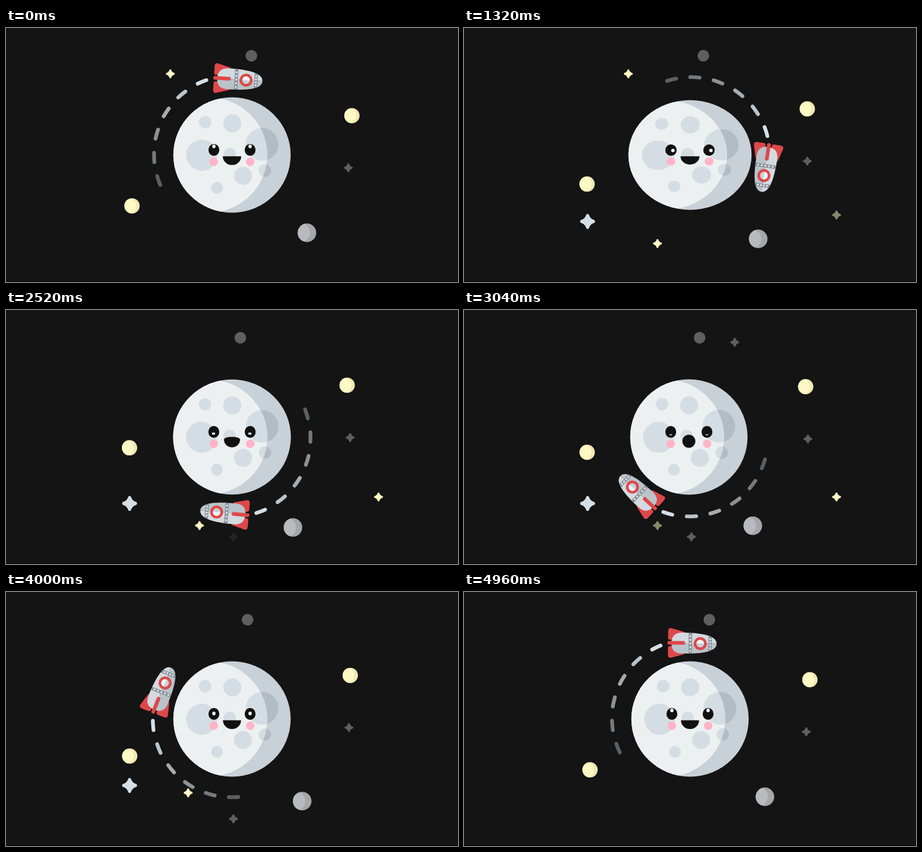
Animation, 799 px wide and 449 px high, one loop 5000 ms. Source, as an HTML page with a canvas:

```html
<!DOCTYPE html>
<html>
<head>
<meta charset="utf-8">
<title>Moon orbit</title>
<style>
html, body { margin: 0; width: 100%; height: 100%; overflow: hidden; background: #141414; }
canvas { display: block; }
</style>
</head>
<body>
<canvas id="stage" width="799" height="449"></canvas>
<script>
const ctx = document.getElementById('stage').getContext('2d');
const LOOP = 5000, TAU = Math.PI * 2;
const BLACK = '#111', RED = '#de484a', YELLOW = '#fef8c4', SILVER = '#d4dee6', GRAY = '#5f5f5f';

const smooth = x => { x = Math.min(1, Math.max(0, x)); return x * x * (3 - 2 * x); };

// Eased value between [time, value] keys
function ease(t, ...keys) {
  let v = keys[0][1];
  for (let i = 1; i < keys.length; i++) {
    const [a, from] = keys[i - 1], [b, to] = keys[i];
    if (t >= a) v = from + (to - from) * smooth((t - a) / (b - a));
  }
  return v;
}

function oval(x, y, rx, ry, fill) {
  ctx.fillStyle = fill;
  ctx.beginPath();
  ctx.ellipse(x, y, rx, ry, 0, 0, TAU);
  ctx.fill();
}
const dot = (x, y, r, fill) => oval(x, y, r, r, fill);

function shape(d, fill) {
  ctx.fillStyle = fill;
  ctx.fill(new Path2D(d));
}

function group(draw) {
  ctx.save();
  draw();
  ctx.restore();
}

// Disc with a crescent of shade on its right side
function globe(x, y, r, light, shade, shift) {
  group(() => {
    dot(x, y, r, shade);
    ctx.clip();
    dot(x - shift, y, r, light);
  });
}

function star(x, y, r, color, alpha = 1) {
  if (alpha <= 0) return;
  group(() => {
    ctx.translate(x, y);
    ctx.scale(r, r);
    ctx.globalAlpha = alpha;
    ctx.fillStyle = color;
    ctx.beginPath();
    for (let i = 0; i < 4; i++) {
      ctx.lineTo(-.18, -.9);
      ctx.quadraticCurveTo(0, -1.1, .18, -.9);
      ctx.quadraticCurveTo(.33, -.33, .9, -.18);
      ctx.rotate(TAU / 4);
    }
    ctx.fill();
  });
}

// x, y, radius, colour, start, end
const twinkles = [
  [290.5, 81, 8, YELLOW, -500, 1950],
  [342, 381, 8, YELLOW, 300, 3240],
  [218.5, 342, 13.3, SILVER, 820, 4450],
  [658.5, 330.5, 8, YELLOW, 1120, 3950],
  [402, 401, 8, GRAY, 2400, 4450],
  [478.5, 57, 8, GRAY, 2600, 3600],
  [322, 355, 8, YELLOW, 3500, 4450]
];

const craters = [
  [352, 166.5, 11], [400, 168.5, 16], [452.5, 205.5, 29], [346, 225, 27.5],
  [395.5, 222.5, 11], [419, 261.5, 16], [373, 282.5, 10.5], [457.5, 252, 11]
];

function sky(t) {
  const c = Math.cos(t / LOOP * TAU);
  const drift = ease(t, [250, 0], [2450, 1], [LOOP, 0]);
  dot(424 + 9.7 * c, 49, 10.3, GRAY);
  globe(607.3 + 4.2 * c, 144 + 11 * c, 13.5, YELLOW, '#f1e7b4', 6);
  globe(217.8 + 2.2 * c + 2.8 * c * c, 279 + 35.4 * c, 13.5, YELLOW, '#f1e7b4', 6);
  globe(532 - 24.8 * drift, 362 + 22.4 * drift, 16.4, '#b7bbc0', '#a5a6aa', 11);
  star(606.7 - 1.6 * c, 236.3 + 10.8 * c, 8, GRAY);
  for (const [x, y, r, color, start, end] of twinkles)
    star(x, y, r, color, smooth(Math.min(t - start, end - t) / 400));
}

function face(t) {
  const lookX = ease(t, [0, 0], [720, 4.7], [1320, 3.2], [2000, -1], [3040, 0], [LOOP, 0]);
  const lookY = ease(t, [0, -6.3], [720, -4], [1320, .5], [2000, 1], [3040, 5], [4000, -.7], [4900, -6.3]);
  const glint = ease(t, [2000, 3.2], [3040, .7], [4000, 3.2]);
  for (const side of [-1, 1]) {
    const x = 399.5 + side * 32;
    dot(x + side * .2, 236.5, 7.5, '#ffb4c7');
    oval(x, 215.5, 9.6, 10.6, BLACK);
    oval(x + lookX, 215.5 + lookY, 2.9, glint, '#fff');
  }

  const open = ease(t, [2300, 0], [2800, 1], [3250, 1], [3800, 0]);
  const grin = ease(t, [0, 16.3], [720, 13.8], [1300, 16]);
  const mix = (a, b) => a + (b - a) * open;
  const y = mix(226.8, 232), w = mix(grin, 11.5);
  ctx.fillStyle = BLACK;
  ctx.beginPath();
  ctx.ellipse(399.5, y, w, mix(15.5, 11.5), 0, 0, Math.PI);
  ctx.ellipse(399.5, y, w, 11.5 * open, 0, Math.PI, TAU);
  ctx.fill();
}

function moon(t) {
  const squash = ease(t, [760, 0], [1350, .05], [1950, .041], [2650, 0]);
  const shift = ease(t, [2650, 0], [2950, -2], [3150, -2], [3500, 0]);
  const surface = (x, ground, pit) => {
    oval(x, 224.5, 103.7, 102, ground);
    ctx.clip();
    for (const [cx, cy, r] of craters) dot(cx, cy, r, pit);
  };
  group(() => {
    ctx.translate(399.5 + shift, 224.5);
    ctx.scale(1 + squash, 1 - squash);
    ctx.translate(-399.5, -224.5);
    group(() => {
      surface(399.5, '#c8d0d8', '#b3bcc4');
      // clip region is the moon's outline from here on
    });
    group(() => {
      ctx.beginPath();
      ctx.ellipse(399.5, 224.5, 103.7, 102, 0, 0, TAU);
      ctx.clip();
      surface(358, '#edf0f1', '#d5dde4');
    });
    face(t);
  });
}

function rivets(x, top, bottom, count) {
  ctx.fillStyle = '#8b9299';
  ctx.fillRect(x - 3, -30, 6, 60);
  for (let i = 0; i < count; i++)
    dot(x, top + (bottom - top) * i / (count - 1), 1.7, '#e6ebee');
}

function rocket() {
  const fin = 'M-41-20Q-41-27-35-25.5L-15-20Q-11-19-11-14L-30-5H-37Q-41-5-41-9Z';
  shape(fin, RED);
  group(() => { ctx.translate(0, 1); ctx.scale(1, -1); shape(fin, RED); });
  group(() => {
    const hull = new Path2D('M-35 1C-35-12-28-18-16-18C8-18 45-16 45 1C45 18 8 19-16 19C-28 19-35 14-35 1Z');
    ctx.clip(hull);
    ctx.fillStyle = '#d2dae0';
    ctx.fillRect(-40, -30, 90, 31);
    ctx.fillStyle = '#b9c3ca';
    ctx.fillRect(-40, 1, 90, 30);
    rivets(-1.5, -12, 14, 5);
    rivets(33.5, -7, 9, 4);
  });
  dot(16, 1, 11.5, RED);
  dot(16, 1, 6.8, '#c7d0d7');
  ctx.fillStyle = '#f0f3f4';
  ctx.beginPath();
  ctx.arc(16, 1, 6.8, Math.PI, TAU);
  ctx.fill();
  ctx.fillStyle = RED;
  ctx.beginPath();
  ctx.roundRect(-42, -3, 31, 6.5, 2.5);
  ctx.fill();
}

function orbit(t) {
  group(() => {
    ctx.translate(400, 225);
    ctx.rotate((3.5 + t / LOOP * 360) * TAU / 360);
    ctx.lineCap = 'round';
    ctx.lineWidth = 6.6;
    ctx.strokeStyle = SILVER;
    for (let i = 0; i < 6; i++) {
      const r = 140.5 - i * .55, mid = -TAU / 4 - (26 + 17.3 * i) * TAU / 360;
      ctx.globalAlpha = 1 - .125 * i;
      ctx.beginPath();
      ctx.arc(0, 0, r, mid - 8.3 / r, mid + 8.3 / r);
      ctx.stroke();
    }
    ctx.globalAlpha = 1;
    ctx.translate(0, -135);
    rocket();
  });
}

function frame() {
  const t = performance.now() % LOOP;
  ctx.fillStyle = '#141414';
  ctx.fillRect(0, 0, 799, 449);
  sky(t);
  moon(t);
  orbit(t);
  ctx.fillStyle = '#000';
  ctx.fillRect(0, 448, 799, 1);
  requestAnimationFrame(frame);
}
frame();
</script>
</body>
</html>
```
